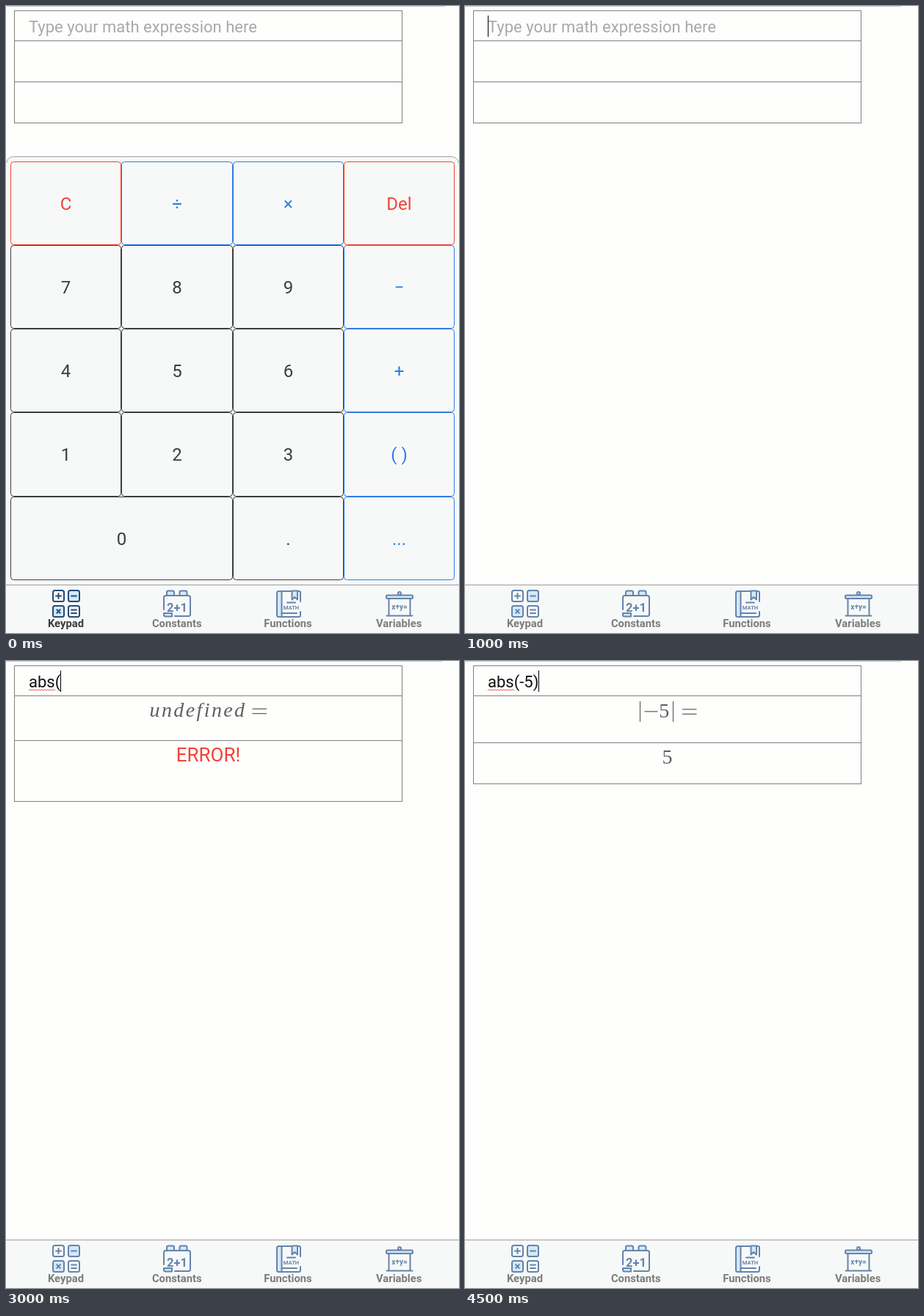
Write an HTML page that moves like this. It is 617 by 855 pixels and loops after 5 s.

```html
<!DOCTYPE html>
<html lang="en">
<head>
<meta charset="utf-8">
<title>Calculator</title>
<style>
html, body { margin: 0; width: 100%; height: 100%; overflow: hidden; background: #fefefd; }
svg { display: block; width: 617px; height: 855px; font-family: Roboto, sans-serif; }
text { white-space: pre; }
.mid { text-anchor: middle; }
.line { fill: none; stroke: #808080; shape-rendering: crispEdges; }
.input { font-size: 22px; }
.math { font: italic 28px "Liberation Serif", serif; fill: #606060; }
.math .num { font-style: normal; }
.op { fill: none; stroke: #606060; stroke-width: 1.2; }
.error { font-size: 26px; fill: #f04438; }
.key { font-size: 24px; }
.key rect { fill: none; stroke: currentColor; }
.key text { fill: currentColor; }
.label { font-size: 14.8px; font-weight: 700; fill: #7b7d7c; }
.icon { color: #6484ac; fill: none; stroke: currentColor; stroke-width: 2; stroke-linecap: round; stroke-linejoin: round; }
.icon text { fill: currentColor; stroke: none; font-weight: 700; }
.icon .tint { fill: #d3e8f8; }

/* hard cuts on a five second loop */
.anim { animation: 5s step-end infinite; }
.pad { animation-name: pad; }
.touch { animation-name: touch; }
.blank { animation-name: blank; }
.undef { animation-name: undef; }
.func { animation-name: func; }
.t30 { animation-name: from30; }
.t50 { animation-name: from50; }
.t60 { animation-name: from60; }
.t70 { animation-name: from70; }
.t80 { animation-name: from80; }
.t90 { animation-name: from90; }
.caret { animation-name: caret; }
.on { animation-name: iconOn; }
.label.on { animation-name: labelOn; }
@keyframes pad { 0% { visibility: visible } 20%, 100% { visibility: hidden } }
@keyframes touch { 0%, 20%, 100% { visibility: hidden } 10% { visibility: visible } }
@keyframes blank { 0% { visibility: visible } 30%, 100% { visibility: hidden } }
@keyframes undef { 0%, 50%, 90%, 100% { visibility: hidden } 30%, 60% { visibility: visible } }
@keyframes func { 0%, 60%, 100% { visibility: hidden } 50% { visibility: visible } }
@keyframes from30 { 0% { visibility: hidden } 30%, 100% { visibility: visible } }
@keyframes from50 { 0% { visibility: hidden } 50%, 100% { visibility: visible } }
@keyframes from60 { 0% { visibility: hidden } 60%, 100% { visibility: visible } }
@keyframes from70 { 0% { visibility: hidden } 70%, 100% { visibility: visible } }
@keyframes from80 { 0% { visibility: hidden } 80%, 100% { visibility: visible } }
@keyframes from90 { 0% { visibility: hidden } 90%, 100% { visibility: visible } }
@keyframes caret {
  0% { visibility: hidden; transform: translateX(31px) }
  20% { visibility: visible; transform: translateX(31px) }
  30% { visibility: visible; transform: translateX(43px) }
  50% { visibility: visible; transform: translateX(67px) }
  60% { visibility: visible; transform: translateX(74px) }
  70% { visibility: visible; transform: translateX(80px) }
  80% { visibility: visible; transform: translateX(93px) }
  90%, 100% { visibility: visible; transform: translateX(100px) }
}
@keyframes iconOn { 0% { color: #274a78 } 20%, 100% { color: #6484ac } }
@keyframes labelOn { 0% { fill: #3a3c3b } 20%, 100% { fill: #7b7d7c } }
</style>
</head>
<body>
<svg viewBox="0 0 617 855">
  <path class="line" style="stroke:#ccc" d="M0 .5H594"/>
  <path class="line anim pad" style="stroke:#ccc" d="M594 .5H598"/>

  <!-- expression table -->
  <path class="line" d="M11 6.5H540M11 47.5H540"/>
  <path class="line anim blank" d="M11.5 6V159.5H539.5V6M11 103.5H540"/>
  <text class="input anim blank" x="31" y="36" fill="#a9a9a9">Type your math expression here</text>

  <g class="anim undef">
    <path class="line" d="M11.5 6V191.5H539.5V6M11 108.5H540"/>
    <text class="math" x="195.5" y="75.5" letter-spacing="2.4">undefined</text>
    <path class="op" d="M335.5 65.3H355M335.5 71.7H355"/>
    <text class="error mid" x="275.5" y="137">ERROR!</text>
  </g>

  <g class="anim func">
    <path class="line" d="M11.5 6V165.5H539.5V6M11 104.5H540"/>
    <text class="math" x="240" y="75.5" letter-spacing=".5">abs</text>
    <path class="op" d="M290 65.3H309.5M290 71.7H309.5"/>
    <text class="math" x="226" y="132.5" letter-spacing="1.8">function</text>
  </g>

  <g class="anim t90">
    <path class="line" d="M11.5 6V167.5H539.5V6M11 111.5H540"/>
    <path class="op" d="M238.5 55V83M283.5 55V83M244.5 68.9H262.5M296 65.9H315.5M296 72.3H315.5"/>
    <g class="math">
      <text class="num" x="264.3" y="76.5">5</text>
      <text class="num mid" x="275.5" y="139.5">5</text>
    </g>
  </g>

  <text class="input" x="31" y="36" fill="#111"><tspan class="anim t30">a</tspan><tspan class="anim t50">bs</tspan><tspan class="anim t60">(</tspan><tspan class="anim t70">-</tspan><tspan class="anim t80">5</tspan><tspan class="anim t90">)</tspan></text>
  <path id="wave" class="anim t60" fill="none" stroke="#e8453c"/>
  <rect class="anim caret" y="13" width="1" height="29" fill="#000"/>

  <!-- keypad -->
  <g id="pad" class="anim pad">
    <path d="M.5 790V216Q.5 205.5 11 205.5H606Q616.5 205.5 616.5 216V790Z" fill="#f7f9f8"/>
    <path d="M.5 214Q2 205.5 11 205.5H606Q615 205.5 616.5 214" fill="none" stroke="#a0a2a1"/>
  </g>
  <circle class="anim touch" cx="116.5" cy="26.5" r="23" fill="#555" fill-opacity=".3" stroke="#555" stroke-opacity=".2"/>

  <!-- tab bar -->
  <rect y="789" width="617" height="66" fill="#f7f9f8"/>
  <path class="line" style="stroke:#9b9d9c" d="M0 789.5H617"/>

  <g class="icon anim on">
    <rect x="64" y="797" width="15" height="15" rx="2.5"/>
    <rect class="tint" x="85" y="797" width="15" height="15" rx="2.5"/>
    <rect class="tint" x="64" y="818" width="15" height="15" rx="2.5"/>
    <rect x="85" y="818" width="15" height="15" rx="2.5"/>
    <path d="M68 804.5H75M71.5 801V808M89 804.5H96M69.3 823.3L73.7 827.7M73.7 823.3L69.3 827.7M89 823.5H96M89 828H96"/>
  </g>

  <g class="icon">
    <path class="tint" d="M219 804V799.5Q219 797.5 221 797.5H227Q229 797.5 229 799.5V804M236.5 804V799.5Q236.5 797.5 238.5 797.5H244.5Q246.5 797.5 246.5 799.5V804"/>
    <path d="M215 823V806.5Q215 804 217.5 804H248.5Q251 804 251 806.5V829.5Q251 832 248.5 832H230"/>
    <path class="tint" d="M215 828H226V832.5H217.5Q215 832.5 215 830Z"/>
    <text class="mid" x="233" y="825.5" font-size="16.5">2+1</text>
  </g>

  <g class="icon">
    <path class="tint" d="M375.5 798H371.5Q369 798 369 800.5V830.5Q369 833 371.5 833H375.5Z"/>
    <path d="M375.5 798H399Q401 798 401 800V812M401 826V830.5Q401 833 398.5 833H375.5M375.5 828H396M383 813.5H394"/>
    <path class="tint" d="M389.5 797.5H397V809.5L393.2 806L389.5 809.5Z"/>
    <text class="mid" x="388.5" y="823" font-size="7.6">MATH</text>
  </g>

  <g class="icon">
    <circle cx="536" cy="801" r="2"/>
    <rect class="tint" x="518" y="803.5" width="36" height="4.5" rx="1.5"/>
    <path d="M521.5 808V831M550.5 808V831M518.5 831.5H553.5"/>
    <text class="mid" x="536" y="823" font-size="10">x+y=</text>
  </g>

  <text class="label mid anim on" x="81.5" y="847">Keypad</text>
  <text class="label mid" x="232.8" y="847">Constants</text>
  <text class="label mid" x="384" y="847">Functions</text>
  <text class="label mid" x="535.2" y="847">Variables</text>

  <g class="anim func">
    <rect x="15.5" y="803.5" width="180" height="30" fill="#e6e8e7" stroke="#959796"/>
    <text x="25.8" y="823" font-size="15" fill="#111">Typesetting math: 100%</text>
  </g>
</svg>
<script>
const pad = document.getElementById('pad');
const xs = [6, 157, 309, 460, 611];
const ys = [212, 326, 440, 554, 669, 783];
const RED = '#f04438', BLUE = '#2f7be8', DARK = '#3c3e3d';

function addNode(parent, tag, attrs, text = '') {
  const node = document.createElementNS('http://www.w3.org/2000/svg', tag);
  for (const name in attrs) node.setAttribute(name, attrs[name]);
  node.textContent = text;
  return parent.appendChild(node);
}

function addKey(text, row, col, span, color) {
  const x = xs[col], y = ys[row];
  const w = xs[col + span] - x, h = ys[row + 1] - y;
  const key = addNode(pad, 'g', { class: 'key', style: `color:${color}` });
  addNode(key, 'rect', { x: x + 0.5, y: y + 0.5, width: w - 1, height: h - 1, rx: 4 });
  addNode(key, 'text', { class: 'mid', x: x + w / 2, y: y + 66.3 }, text);
}

const rows = [
  ['C', '÷', '×', 'Del'],
  ['7', '8', '9', '−'],
  ['4', '5', '6', '+'],
  ['1', '2', '3', '( )'],
  ['0', '', '.', '...']
];
rows.forEach((row, r) => row.forEach((text, c) => {
  if (!text) return;
  const color = /C|Del/.test(text) ? RED : r === 0 || c === 3 ? BLUE : DARK;
  addKey(text, r, c, text === '0' ? 2 : 1, color);
}));

document.getElementById('wave').setAttribute('d', 'M31 40.5' + 'l2-2 2 2'.repeat(9));
</script>
</body>
</html>
```
